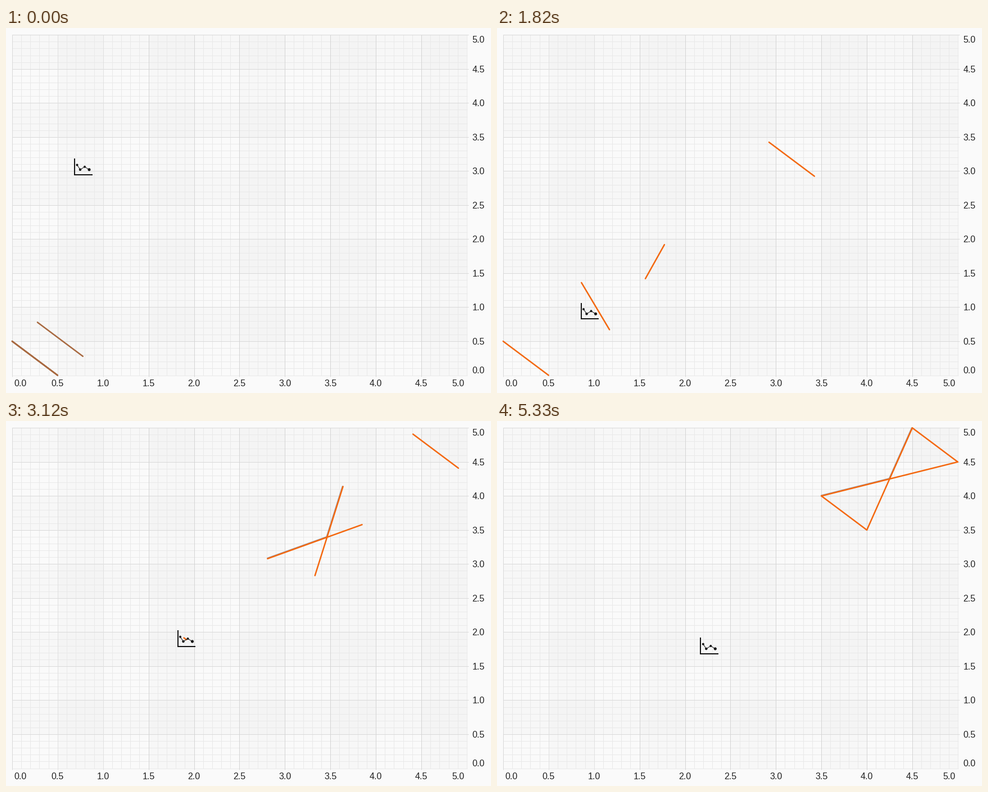
A matplotlib script for the animation above (5.46 s loop, 863 by 649 pixels).

```python
import matplotlib.pyplot as plt
import numpy as np
from matplotlib.animation import FuncAnimation
from matplotlib.patches import Rectangle

W, H, DPI = 863, 649, 72  # at 72 dpi one point is one pixel
FRAMES, INTERVAL = 42, 130
ORANGE, BROWN = np.array([0.955, 0.405, 0.055]), np.array([0.66, 0.41, 0.25])
INK = "#161616"
FONT = "Liberation Sans"


def px(v):
    return 10.9 + 161.8 * np.asarray(v)


def py(v):
    return 617.5 - 121.05 * np.asarray(v)


fig = plt.figure(figsize=(W / DPI, H / DPI), dpi=DPI, facecolor="#fafafa")
ax = fig.add_axes([0, 0, 1, 1])
ax.set_xlim(0, W)
ax.set_ylim(H, 0)
ax.axis("off")

left, right, top, bottom = px(0), px(5) + 1, py(5), py(0)


def draw_grid():
    for i in range(5):
        x, y = px(i + 0.5), py(i + 1)
        for corner, w, h in (((x, top), px(0.5) - left, bottom - top),
                             ((left, y), right - left, bottom - py(0.5))):
            ax.add_patch(Rectangle(corner, w, h, fc="black", alpha=0.012, lw=0))
    minor = np.arange(51) / 10
    ax.vlines(px(minor), top, bottom, color="#e9e9e9", lw=1, zorder=2)
    ax.hlines(py(minor), left, right, color="#e9e9e9", lw=1, zorder=2)
    major = np.arange(1, 10) / 2
    shades = ["#e0e0e0"] * 2 + ["#d4d4d4"] * 7
    ax.hlines(py(major), left, right + 2, color="#d9d9d9", lw=1, zorder=3)
    ax.vlines(px(major), top, bottom + 2, color=shades, lw=1, zorder=3)
    ax.vlines(left, top, bottom + 2, color="#d9d9d9", lw=1, zorder=3)
    ax.hlines(top, left, right + 2, color="#d9d9d9", lw=1, zorder=3)


def draw_labels():
    style = dict(family=FONT, size=16, color="#222222", ha="center", va="baseline")
    for v in np.arange(11) / 2:
        # the outermost labels are kept inside the plot area
        ax.text(np.clip(px(v), 25.5, 805), 637.3, f"{v:.1f}", **style)
        ax.text(840.5, np.clip(py(v), 20.2, 608.5) + 5.8, f"{v:.1f}", **style)


draw_grid()
draw_labels()

# Every edge starts on the same segment and travels to its own end segment.
START = np.array([(0, 0.5), (0.5, 0)])
ENDS = np.array([
    [(4.5, 5), (5, 4.5)],
    [(5, 4.5), (3.5, 4)],
    [(4.5, 5), (4, 3.5)],
    [(4, 3.5), (3.5, 4)],
])


def progress(n):
    lead = (1 - np.cos(np.pi * min(0.16 + 0.0312 * n, 1))) / 2
    linear = [(n - begin) / length
              for begin, length in ((5.45, 24.1), (10.9, 16.2), (16.35, 16.2))]
    return np.clip([lead, *linear], 0, 1)


def new_line(color, lw, z):
    return ax.plot([], [], color=color, lw=lw, zorder=z, solid_capstyle="round")[0]


shadows = [new_line("#9a9aa4", 2, 4) for _ in range(2)]
edges = [new_line(ORANGE, 2.5, 5) for _ in ENDS]

# Pointer icon: an L-shaped axis with a small dotted chart, relative to its corner.
AXIS = np.array([(0, -28.5), (0, 0), (31.5, 0)])
DOTS = np.array([(4.5, -17), (10, -8.7), (18, -13.7), (26, -8.7)])
icon_axis = ax.plot([], [], color=INK, lw=2, zorder=7, solid_joinstyle="miter",
                    solid_capstyle="butt")[0]
icon_line = new_line(INK, 1, 7)
icon_dots = ax.scatter(*DOTS.T, s=[16, 20, 16, 27], color=INK, lw=0, zorder=8)

PATH_N = [0, 6, 14, 20, 24, 33, 41]
PATH_X = [122, 174, 149.5, 305, 305.5, 300, 362.3]
PATH_Y = [260.5, 499, 517, 401, 400.7, 404.5, 413.7]


def place_icon(n):
    corner = np.array([np.interp(n, PATH_N, PATH_X), np.interp(n, PATH_N, PATH_Y)])
    icon_axis.set_data(*(AXIS + corner).T)
    icon_line.set_data(*(DOTS + corner).T)
    icon_dots.set_offsets(DOTS + corner)


def crossing(a, b):
    """Point where the lines through segments a and b meet."""
    m = np.column_stack([a[1] - a[0], b[0] - b[1]])
    return a[0] + np.linalg.solve(m, b[0] - a[0])[0] * (a[1] - a[0])


def update(n):
    segments = [START + p * (end - START) for p, end in zip(progress(n), ENDS)]
    color = ORANGE + (BROWN - ORANGE) * np.exp(-n / 2)
    for line, seg in zip(edges, segments):
        line.set_data(px(seg[:, 0]), py(seg[:, 1]))
        line.set_color(color)

    # faint grey rim on the outer arms of the cross
    for shadow in shadows:
        shadow.set_visible(n >= 22)
    if n >= 22:
        wide, tall = segments[1], segments[2]
        middle = crossing(wide, tall)
        arms = ((wide[1], (-0.3, -1)), (tall[0], (-1, -0.3)))
        for shadow, (tip, (dx, dy)) in zip(shadows, arms):
            arm = np.array([tip, middle])
            shadow.set_data(px(arm[:, 0]) + dx, py(arm[:, 1]) + dy)
            shadow.set_alpha(min(1, 0.35 + 0.07 * abs(n - 33)))

    place_icon(n)
    return [*shadows, *edges, icon_axis, icon_line, icon_dots]


anim = FuncAnimation(fig, update, frames=FRAMES, interval=INTERVAL,
                     repeat=True, repeat_delay=0, blit=False)
plt.show()
```
